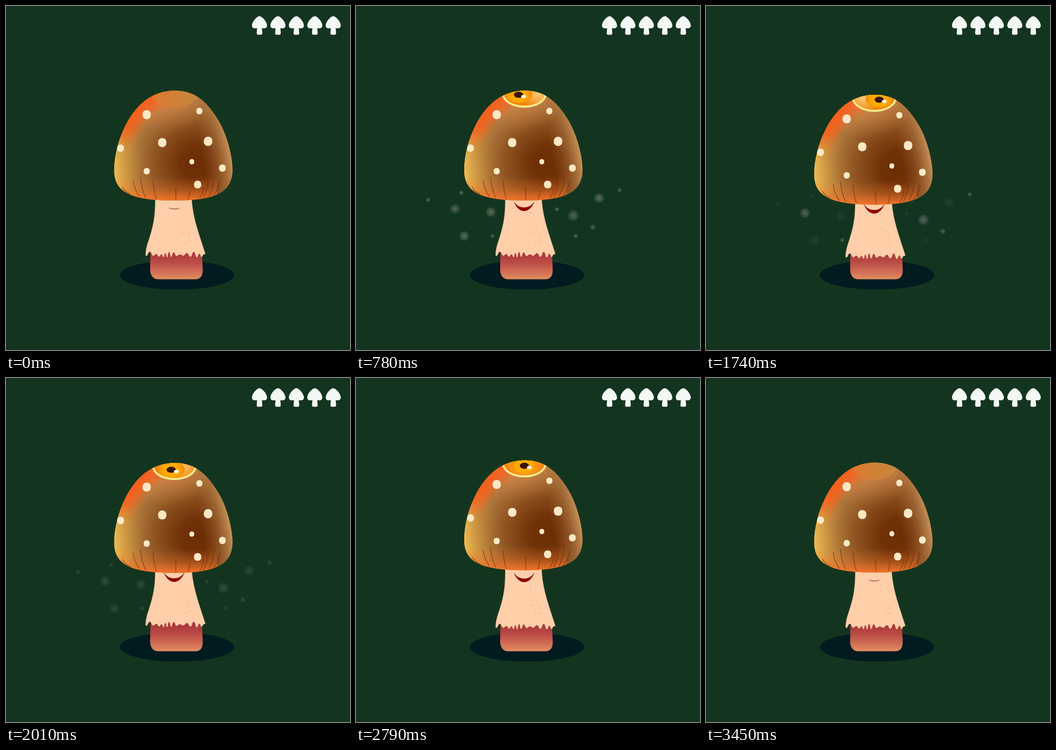
An HTML page with a canvas for the animation above (3.6 s loop, 709x709 px).

```html
<!DOCTYPE html>
<html lang="en">
<head>
<meta charset="utf-8">
<title>Mushroom</title>
<style>
html, body { margin: 0; width: 100%; height: 100%; overflow: hidden; background: #13351f; }
canvas { display: block; }
</style>
</head>
<body>
<canvas id="stage" width="709" height="709"></canvas>
<script>
const ctx = document.getElementById('stage').getContext('2d');
const LOOP = 3600, STEP = 30, TAU = Math.PI * 2;

const mix = (a, b, p) => a + (b - a) * p;

// Smooth step from 0 to 1 between two times.
function ramp(t, from, to) {
  const p = Math.min(1, Math.max(0, (t - from) / (to - from)));
  return p * p * (3 - 2 * p);
}

const wave = (t, peak, period) => Math.cos(TAU * (t - peak) / period);

function poseAt(t) {
  const cap = 10 * ramp(t, 1050, 1600) - 19.5 * ramp(t, 1600, 2450) + 9.5 * ramp(t, 2450, 3120);
  const stem = 7 * ramp(t, 800, 1500) - 14 * ramp(t, 1500, 2200) + 7 * ramp(t, 2200, 2800);
  const left = ramp(t, 540, 760), right = ramp(t, 960, 1230);
  const back = ramp(t, 1760, 2040), centre = ramp(t, 2300, 2600);
  const shown = ramp(t, 560, 720) * (1 - ramp(t, 2200, 2720));
  return {
    cap, stem,
    mouth: cap * 0.4 + stem * 0.6,
    open: ramp(t, 60, 520) - ramp(t, 3020, 3450),
    lookX: 347 - 12 * left + 22 * right - 17 * back + 7 * centre,
    lookY: 185.5 - 2.5 * left - right + 2.5 * ramp(t, 1260, 1740) + 4 * back - 3 * centre,
    slowGlow: shown * (0.6 + 0.4 * wave(t, 750, 1900)),
    fastGlow: shown * (0.6 + 0.4 * wave(t, 780, 960))
  };
}

function seeded(seed) {
  return () => (seed = (seed * 16807) % 2147483647) / 2147483647;
}

function addStops(gradient, stops) {
  for (const [at, color] of stops) gradient.addColorStop(at, color);
  return gradient;
}
const linear = (x0, y0, x1, y1, ...stops) => addStops(ctx.createLinearGradient(x0, y0, x1, y1), stops);
const radial = (x, y, r, ...stops) => addStops(ctx.createRadialGradient(x, y, 0, x, y, r), stops);

function ellipse(x, y, rx, ry, fill) {
  ctx.beginPath();
  ctx.ellipse(x, y, rx, ry, 0, 0, TAU);
  ctx.fillStyle = fill;
  ctx.fill();
}

// Soft elliptical patch of light that fades to nothing at its rim.
function patch(x, y, rx, ry, rgb, alpha) {
  ctx.save();
  ctx.translate(x, y);
  ctx.scale(rx, ry);
  ctx.fillStyle = radial(0, 0, 1, [0, `rgba(${rgb},${alpha})`], [0.5, `rgba(${rgb},${alpha * 0.5})`],
    [1, `rgba(${rgb},0)`]);
  ctx.fillRect(-1, -1, 2, 2);
  ctx.restore();
}

const capShape = new Path2D(`M349 174.5 C300 174 268 205 248 243 C232 273 223 308 223 338
  C223 380 250 401 347 401 C440 401 467 380 467 336 C466 305 455 265 438 236
  C412 192 385 174.5 349 174.5Z`);
const iconShape = new Path2D(`M0 21 C5 21 15.5 32 15.5 40 C15.5 46 10.5 47 5 45.5 L5.8 55
  Q6 59.3 3 59.3 H-3 Q-6 59.3 -5.8 55 L-5 45.5 C-10.5 47 -15.5 46 -15.5 40 C-15.5 32 -5 21 0 21Z`);
const baseShape = new Path2D(`M298 495 H403 L405.5 543 Q406 563 390 563.3 H314
  Q298 563 297 543Z`);

// x, y, radius
const spots = [[290, 224, 8.5], [398.5, 216.5, 6.2], [322, 281.5, 8.5], [416.5, 279, 8.7], [236, 293, 7],
  [383, 321, 5], [290, 340.5, 6.2], [446, 334, 6.9], [395, 368, 7.5]];
const slowMotes = [[149, 399.5, 5], [217, 385, 5], [278, 424.5, 11], [223, 474, 11], [414, 419, 5],
  [453, 474, 5], [501, 396, 11]];
const fastMotes = [[204, 418, 11], [281, 474, 5], [448, 432, 12], [488, 456, 6], [543.5, 379.5, 5]];

function drawIcons() {
  ctx.fillStyle = '#f4f8f4';
  for (let i = 0; i < 5; i++) {
    ctx.save();
    ctx.translate(522.5 + 38 * i, 0);
    ctx.fill(iconShape);
    ctx.restore();
  }
}

function drawBase() {
  ellipse(352.5, 554.5, 118, 30, '#021b20');
  ctx.fillStyle = linear(0, 508, 0, 563, [0, '#aa3439'], [0.4, '#bd4e47'], [1, '#e18b60']);
  ctx.fill(baseShape);
}

// Dripping hem from right to left: tips and notches alternate, unevenly spaced.
function traceHem() {
  const steps = 22;
  let px = 411, py = 511;
  for (let i = 1; i <= steps; i++) {
    const u = i / steps;
    const x = 411 - 122 * u + 4.5 * Math.sin(3 * Math.PI * u);
    const y = i % 2 ? 509.5 - 2.8 * wave(x, 339, 45) : 516.3 + 1.8 * wave(x, 330, 63);
    const mid = (px + x) / 2;
    ctx.bezierCurveTo(mid, py, mid, y, x, y);
    [px, py] = [x, y];
  }
}

function drawStem(dy) {
  ctx.save();
  ctx.translate(0, dy);
  ctx.beginPath();
  ctx.moveTo(307.5, 360);
  ctx.lineTo(383, 360);
  ctx.lineTo(383, 402);
  ctx.bezierCurveTo(386, 440, 399, 473, 411, 511);
  traceHem();
  ctx.bezierCurveTo(286, 515, 289, 496, 294, 483);
  ctx.bezierCurveTo(304, 452, 307, 436, 307.5, 402);
  ctx.closePath();
  ctx.fillStyle = '#ffcfaa';
  ctx.fill();
  ctx.strokeStyle = 'rgba(190,135,95,.45)';
  ctx.lineWidth = 0.7;
  ctx.stroke();
  const random = seeded(41);
  for (let i = 0; i < 24; i++) {
    const y = 412 + 78 * random(), r = 0.7 + 1.2 * random();
    ellipse(350 + (y - 412) * 0.2 + 17 * random(), y, r, r * 1.1, '#f0c29c');
  }
  ctx.restore();
}

function drawMouth(dy, open) {
  const half = mix(11, 20.5, open), edge = mix(416, 404, open) + dy;
  const arc = (sag, dir) => ctx.bezierCurveTo(346.5 - dir * half * 0.55, edge + sag / 0.75,
    346.5 + dir * half * 0.55, edge + sag / 0.75, 346.5 + dir * half, edge);
  ctx.beginPath();
  ctx.moveTo(346.5 - half, edge);
  arc(mix(2, 11.5, open), 1);
  arc(mix(2.8, 18.3, open), -1);
  ctx.fillStyle = ctx.strokeStyle = open > 0.3 ? '#8e0204' : '#a43a32';
  ctx.lineWidth = 0.6;
  ctx.fill();
  ctx.stroke();
}

function drawEye(x, y, open) {
  if (open > 0) {
    ellipse(347, 181, 46, 28.5, '#ffed91');
    ctx.save();
    ctx.beginPath();
    ctx.ellipse(347, 180.5, 42, 25, 0, 0, TAU);
    ctx.clip();
    ctx.fillStyle = '#f4860f';
    ctx.fillRect(300, 150, 95, 65);
    patch(347 + (347 - x) * 2.3, 182, 36, 28, '255,222,150', 0.75);
    ellipse(x, y - 1, 28, 17, radial(x, y, 28, [0, '#ffb600'], [0.6, '#ffa600'], [1, '#f68c05']));
    ellipse(x, y, 9.5, 6.3, '#3a1303');
    ellipse(x + 10.5, y + 3.6, 5, 3.4, '#fffdf0');
    ctx.restore();
  }
  if (open < 1) {
    ellipse(347.5, mix(181, 152, open), 46.5, 28.7,
      linear(302, 0, 393, 0, [0, '#e27930'], [0.4, '#d27f35'], [1, '#c6863e']));
  }
}

function shadeCap() {
  ctx.fillStyle = radial(395, 325, 180, [0, '#6c2d04'], [0.2, '#723208'], [0.45, '#8a4f1d'],
    [0.7, '#a87138'], [1, '#d2944a']);
  ctx.fillRect(220, 170, 250, 235);
  ctx.fillStyle = linear(223, 330, 300, 322, [0, 'rgba(238,188,84,.95)'], [0.35, 'rgba(214,162,66,.6)'],
    [1, 'rgba(160,105,45,0)']);
  ctx.fillRect(220, 170, 100, 235);
  patch(330, 178, 105, 85, '222,138,78', 0.85);
  ctx.fillStyle = linear(467, 310, 405, 322, [0, 'rgba(212,162,102,.9)'], [0.45, 'rgba(180,126,74,.45)'],
    [1, 'rgba(150,95,50,0)']);
  ctx.fillRect(395, 170, 75, 235);
  ctx.fillStyle = linear(0, 352, 0, 402, [0, 'rgba(255,118,42,0)'], [0.5, 'rgba(245,115,42,.3)'],
    [1, 'rgba(255,118,42,.92)']);
  ctx.fillRect(220, 352, 215, 53);
  ctx.strokeStyle = radial(268, 213, 85, [0, 'rgba(255,88,22,.22)'], [0.5, 'rgba(255,88,22,.18)'],
    [1, 'rgba(255,100,30,0)']);
  for (let width = 8; width <= 64; width += 8) {
    ctx.lineWidth = width;
    ctx.stroke(capShape);
  }
}

function drawCreases() {
  ctx.strokeStyle = 'rgba(100,42,8,.7)';
  ctx.lineWidth = 1.3;
  [240, 262, 277, 303, 350, 379, 408, 417, 430, 441].forEach((x, i) => {
    const top = 366 + 14 * wave(i, 5, 6), foot = mix(x, 350, 0.15);
    const bottom = 400 - 0.00145 * (foot - 347) ** 2;
    ctx.beginPath();
    ctx.moveTo(x, top);
    ctx.quadraticCurveTo(mix(x, foot, 0.2), mix(top, bottom, 0.6), foot, bottom);
    ctx.stroke();
  });
}

function drawCap({ cap, lookX, lookY, open }) {
  ctx.save();
  ctx.translate(0, cap);
  ctx.clip(capShape);
  shadeCap();
  drawCreases();
  ctx.fillStyle = '#ffe8c6';
  for (const [x, y, r] of spots) {
    ctx.beginPath();
    ctx.roundRect(x - r, y - r * 1.08, r * 2, r * 2.16, r * 0.92);
    ctx.fill();
  }
  drawEye(lookX, lookY, open);
  ctx.restore();
}

function drawMotes(motes, dy, glow, rgb) {
  for (const [x, y, r] of motes) {
    ellipse(x, y + dy, r, r, radial(x, y + dy, r, [0, `rgba(${rgb},${glow * 0.65})`],
      [0.2, `rgba(${rgb},${glow * 0.42})`], [0.7, `rgba(${rgb},${glow * 0.24})`], [1, `rgba(${rgb},0)`]));
  }
}

function draw(t) {
  const pose = poseAt(t);
  ctx.fillStyle = '#13351f';
  ctx.fillRect(0, 0, 709, 709);
  drawIcons();
  drawBase();
  drawStem(pose.stem);
  drawMouth(pose.mouth, pose.open);
  drawMotes(slowMotes, pose.cap, pose.slowGlow, '150,158,140');
  drawMotes(fastMotes, pose.cap, pose.fastGlow, '140,140,152');
  drawCap(pose);
}

const start = performance.now();
function tick() {
  const elapsed = (performance.now() - start) % LOOP;
  draw(Math.floor(elapsed / STEP) * STEP);
  requestAnimationFrame(tick);
}
tick();
</script>
</body>
</html>
```
